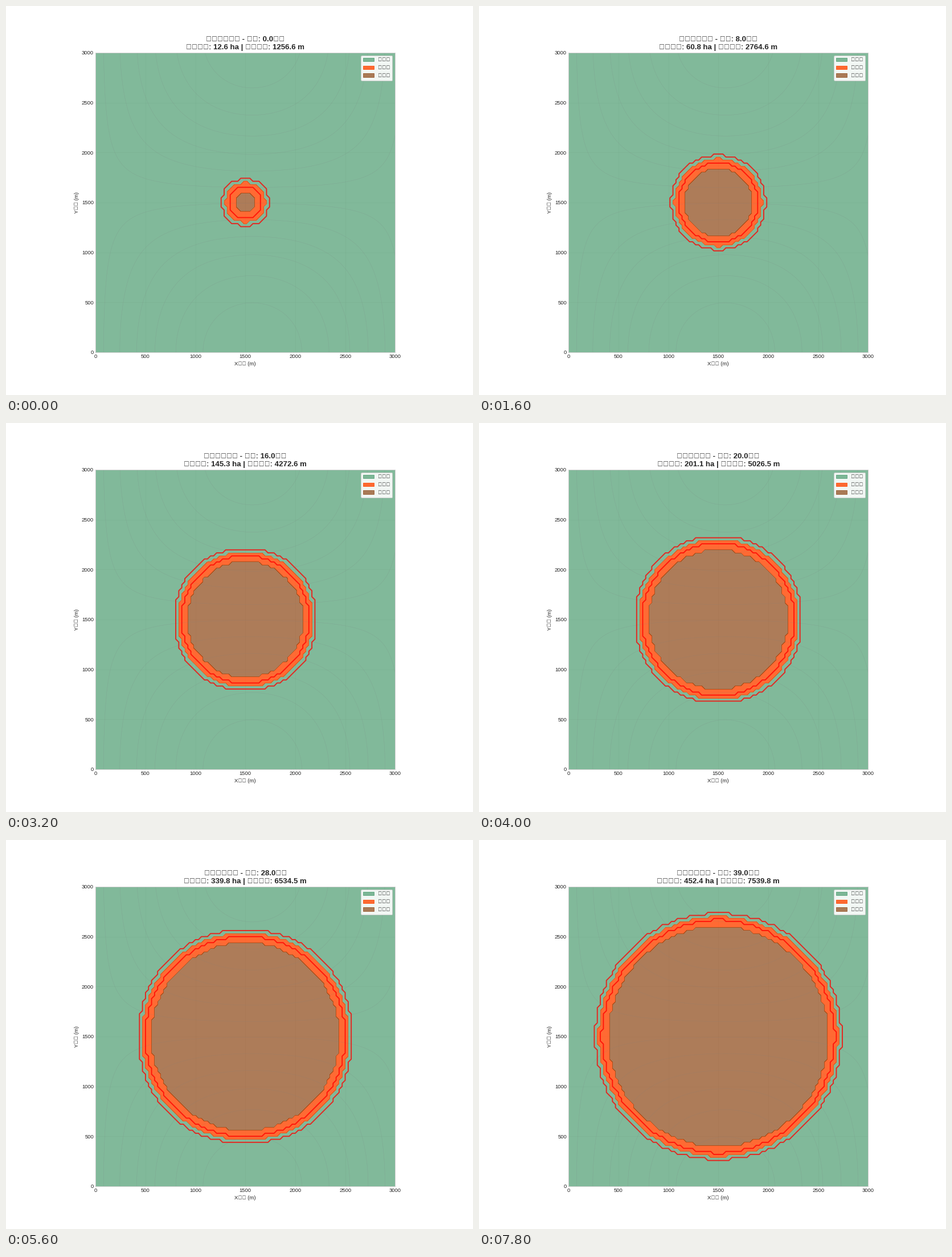
These frames come from a looping animation (820x683 px, 8 s). A matplotlib script:

```python
import numpy as np
import matplotlib.pyplot as plt
from matplotlib.animation import FuncAnimation
from matplotlib.patches import Patch

W, H, DPI = 820, 683, 68
PT = 68.3 / DPI              # point size correction
SIZE, HOURS = 3000, 40
START, SPEED, LIMIT, DEPTH = 200, 30, 1200, 100

plt.style.use("seaborn-v0_8-whitegrid")
plt.rcParams.update({
    "font.family": ["Liberation Sans"],
    "font.size": 10 * PT,
    "legend.frameon": True,
})

axis = np.linspace(0, SIZE, 100)
X, Y = np.meshgrid(axis, axis)
dist = np.hypot(X - SIZE / 2, Y - SIZE / 2)
terrain = 100 + 50 * np.sin(X / 1000) * np.cos(Y / 1000)

# colour, opacity and label of unburnt, burning and burnt ground;
# the font has no CJK glyphs, so these labels show as boxes
ZONES = [
    ("seagreen", 0.6, "未燃烧"),
    ("orangered", 0.8, "燃烧中"),
    ("saddlebrown", 0.7, "已燃烧"),
]

fig, ax = plt.subplots(figsize=(W / DPI, H / DPI), dpi=DPI)
ax.set_aspect("equal")
ax.set_xlim(0, SIZE)
ax.set_ylim(0, SIZE)
ax.set_xlabel("X坐标 (m)")
ax.set_ylabel("Y坐标 (m)")
ax.grid(True, alpha=0.3)
ax.contour(X, Y, terrain, levels=np.arange(56, 145, 8),
           colors="gray", alpha=0.3, linewidths=0.5)
ax.legend(handles=[Patch(color=c, alpha=a, label=s) for c, a, s in ZONES],
          loc="upper right", framealpha=0.9)
layers = []


def spread(mask):
    """Grow a mask by one cell in all eight directions."""
    out = mask.copy()
    for dy in (-1, 0, 1):
        for dx in (-1, 0, 1):
            out |= np.roll(mask, (dy, dx), axis=(0, 1))
    return out


def draw(hour):
    while layers:
        layers.pop().remove()

    r = min(START + SPEED * hour, LIMIT)
    reached = dist <= r
    burnt = dist <= r - DEPTH
    masks = (~reached, reached & ~burnt, burnt)
    for mask, (color, alpha, _) in zip(masks, ZONES):
        layers.append(ax.contourf(X, Y, mask.astype(float), levels=[0.5, 1.5],
                                  colors=[color], alpha=alpha))

    front = spread(reached) & spread(~reached)
    layers.append(ax.contour(X, Y, front.astype(float), levels=[0.5],
                             colors="red", linewidths=2, alpha=0.8))

    area, edge = np.pi * r ** 2 / 1e4, 2 * np.pi * r
    ax.set_title(f"森林火灾蔓延 - 时间: {hour:.1f}小时\n"
                 f"燃烧面积: {area:.1f} ha | 火线长度: {edge:.1f} m",
                 fontsize=14 * PT, fontweight="bold")
    return layers


anim = FuncAnimation(fig, draw, frames=HOURS, init_func=lambda: draw(0),
                     interval=200, repeat=True, repeat_delay=0, blit=False)
plt.show()
```
